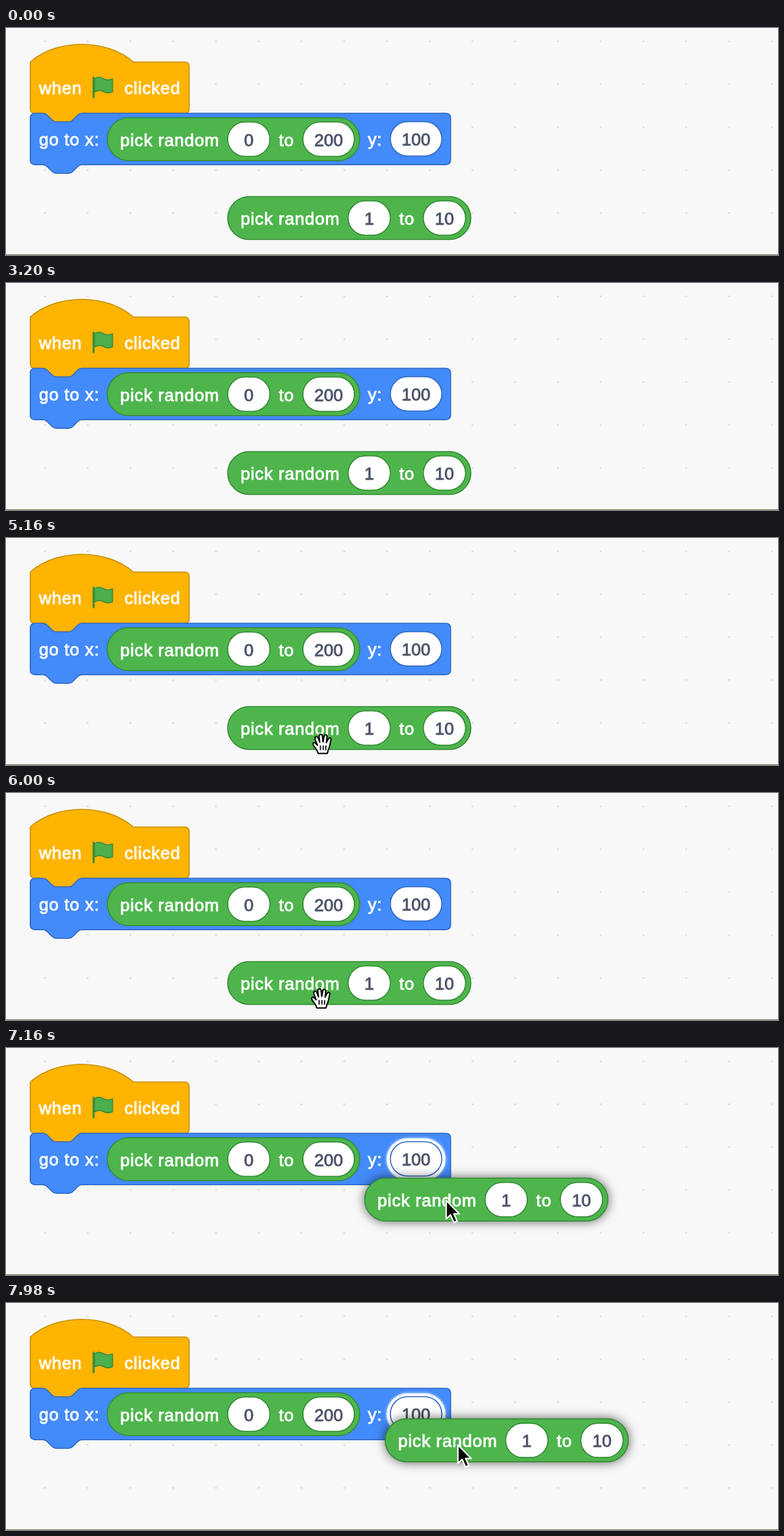
An HTML page for the animation above (8 s loop, 1170 px wide and 344 px high).

```html
<!DOCTYPE html>
<html lang="en">
<head>
<meta charset="utf-8">
<title>Dragging a block</title>
<style>
html, body { margin: 0; width: 100%; height: 100%; overflow: hidden; background: #f8f8f8; }
svg { display: block; width: 1170px; height: 344px; }
text {
  font: 26px "Liberation Sans", Arial, sans-serif;
  letter-spacing: .8px; fill: #fff; stroke: #fff; stroke-width: .9px;
}
text.num { letter-spacing: 0; fill: #4d5369; stroke: #4d5369; text-anchor: middle; }
.hat { fill: #ffb400; stroke: #c8920a; }
.move { fill: #438afa; stroke: #3069c2; }
.op { fill: #4eb54c; stroke: #348a34; }
.slot, #glow { fill: #fff; }
.block { stroke-width: 1.6px; }
.lift { filter: drop-shadow(0 0 8px rgba(0, 0, 0, .6)); }
#glow { filter: drop-shadow(0 0 2px #fff); }
</style>
</head>
<body>
<svg viewBox="0 0 1170 344">
  <defs>
    <pattern id="dots" x="57.5" y="19" width="64.8" height="65" patternUnits="userSpaceOnUse">
      <rect width="3" height="2.5" rx="1" fill="#dedede"/>
    </pattern>
  </defs>
  <rect width="1170" height="344" fill="#f8f8f8"/>
  <rect width="1170" height="344" fill="url(#dots)"/>
  <rect y="343" width="1170" height="1" fill="#77775c"/>
  <g id="script"></g>
  <g id="loose"></g>
  <g id="hand" stroke="#000" stroke-width="2" stroke-linejoin="round">
    <path fill="#fff" d="M-5 14.5C-6 9-9 7-12 2.500C-14-.5-12-3-9.500-1.500L-6 2L-9.500-7C-10.500-11-6.500-12.500-5-9L-2.500-2.500L-3.500-11.500C-3.500-15.500 1-15.500 1.500-12L2.500-3L4-11.500C5-15 9-14 8.500-10.500L7.500-2L10.500-7.500C12-10.500 15.500-9 14.500-5.500C12.500 0 13.500 4 10.500 8.500L9 14.500Z"/>
    <path fill="none" stroke-width="1.7" d="M-1.5 2.5V9.5M2.7 2.5V9.5M6.7 2.5V9.5"/>
  </g>
  <path id="arrow" stroke="#fff" stroke-width="2.2" stroke-linejoin="round"
    d="M0 0V28L6.5 22L11.5 33.5L16.5 31.3L11.7 20.5H20Z"/>
</svg>
<script>
const LOOP = 8000;
const GREEN_EDGE = "#348a34", BLUE_EDGE = "#3069c2";
const $ = id => document.getElementById(id);

const pill = (cls, x, y, w, h) =>
  `<rect class="block ${cls}" x="${x}" y="${y}" width="${w}" height="${h}" rx="${h / 2}"/>`;
const label = (x, y, s) => `<text x="${x}" y="${y}">${s}</text>`;
const slot = (cx, cy, w, s, edge) =>
  `<g stroke="${edge}">${pill("slot", cx - w / 2, cy - 26, w, 52)}</g>` +
  `<text class="num" x="${cx}" y="${cy + 10}">${s}</text>`;

// Outline parts shared by the stack blocks, in block units.
const tab = "H48c-2 0-3 1-4 2l-4 4c-1 1-2 2-4 2h-12c-2 0-3-1-4-2l-4-4c-1-1-2-2-4-2H4a4 4 0 0 1-4-4z";
const notch = "H12c2 0 3 1 4 2l4 4c1 1 2 2 4 2h12c2 0 3-1 4-2l4-4c1-1 2-2 4-2";
const side = w => `H${w - 4}a4 4 0 0 1 4 4v40a4 4 0 0 1-4 4`;
const stack = (cls, y, d) =>
  `<path class="${cls}" transform="translate(36.8 ${y}) scale(1.625)" d="${d}"/>`;

// Operator block with its top left corner at 0,0.
function randomBlock(a, b, w) {
  return pill("op", 0, 0, 304.5 + w, 65) + label(19.5, 42.5, "pick random") +
    slot(214.5, 32.5, 64, a, GREEN_EDGE) + label(260, 42.5, "to") +
    slot(296.5 + w / 2, 32.5, w, b, GREEN_EDGE);
}

$("script").innerHTML =
  stack("hat", 51.5, "M0 0c25-22 71-22 96 0" + side(148.2) + tab) +
  label(50, 100, "when") + label(179.5, 100, "clicked") +
  `<g stroke="#3a8a3c" stroke-linejoin="round" stroke-linecap="round">
    <path fill="#4cae4c" stroke-width="1.5"
      d="M134 77C141 72 146 76 151 78C155 79.5 158 78.5 161.5 77V96.500C155 100 151 98 146 95.500C142 94 138 95 134 97Z"/>
    <path stroke-width="3" d="M132.800 75V105"/>
  </g>` +
  stack("move", 129.2, "M0 4A4 4 0 0 1 4 0" + notch + side(392) + tab) +
  label(50, 178, "go to x:") +
  `<g transform="translate(153.5 136)">${randomBlock(0, 200, 78)}</g>` +
  label(548.5, 178, "y:") +
  `<g id="glow">${pill("", 577, 137, 89, 63)}</g>` +
  slot(621.5, 168, 78, 100, BLUE_EDGE);
$("loose").innerHTML = randomBlock(1, 10, 64);

const HOME = { x: 336, y: 255.5 };
const GRAB = { x: 446, y: 295 };
const DRAG = 6725;   // drag begins
const LAG = 95;      // the block trails the pointer
const DECAY = 168;   // time constant of the slowing drag

const mix = (a, b, k) => a + (b - a) * k;
const ramp = (t, from, to) => Math.min(1, Math.max(0, (t - from) / (to - from)));
const smooth = k => k * k * (3 - 2 * k);
const easeOut = k => 1 - (1 - k) ** 3;

// How far the pointer has been dragged: a quick pull that dies away, then a nudge up.
function pull(t) {
  const k = 1 - Math.exp(-Math.max(0, t - DRAG) / DECAY);
  return { x: 239 * k, y: -72 * k ** 1.5 - 8 * smooth(ramp(t, 7540, 7900)) };
}

// The open hand rises from below the stage, rests, then goes to the grab point.
function handAt(t) {
  const rise = easeOut(ramp(t, 3400, 4000));
  const reach = smooth(ramp(t, 5900, 6550));
  return { x: mix(478, GRAB.x + 2, reach), y: mix(mix(364, 312, rise), GRAB.y + 7, reach) };
}

const place = (id, p, q) =>
  $(id).setAttribute("transform", `translate(${p.x + q.x} ${p.y + q.y})`);
const show = (id, on) => $(id).setAttribute("visibility", on ? "visible" : "hidden");

function draw(t) {
  const dragging = t >= DRAG;
  place("loose", HOME, pull(t - LAG));
  place("arrow", GRAB, pull(t));
  place("hand", handAt(t), { x: 0, y: 0 });
  $("loose").classList.toggle("lift", dragging);
  show("hand", !dragging);
  show("arrow", dragging);
  show("glow", t >= 7040);
}

const start = performance.now();
function tick() {
  draw((performance.now() - start) % LOOP);
  requestAnimationFrame(tick);
}
tick();
</script>
</body>
</html>
```
